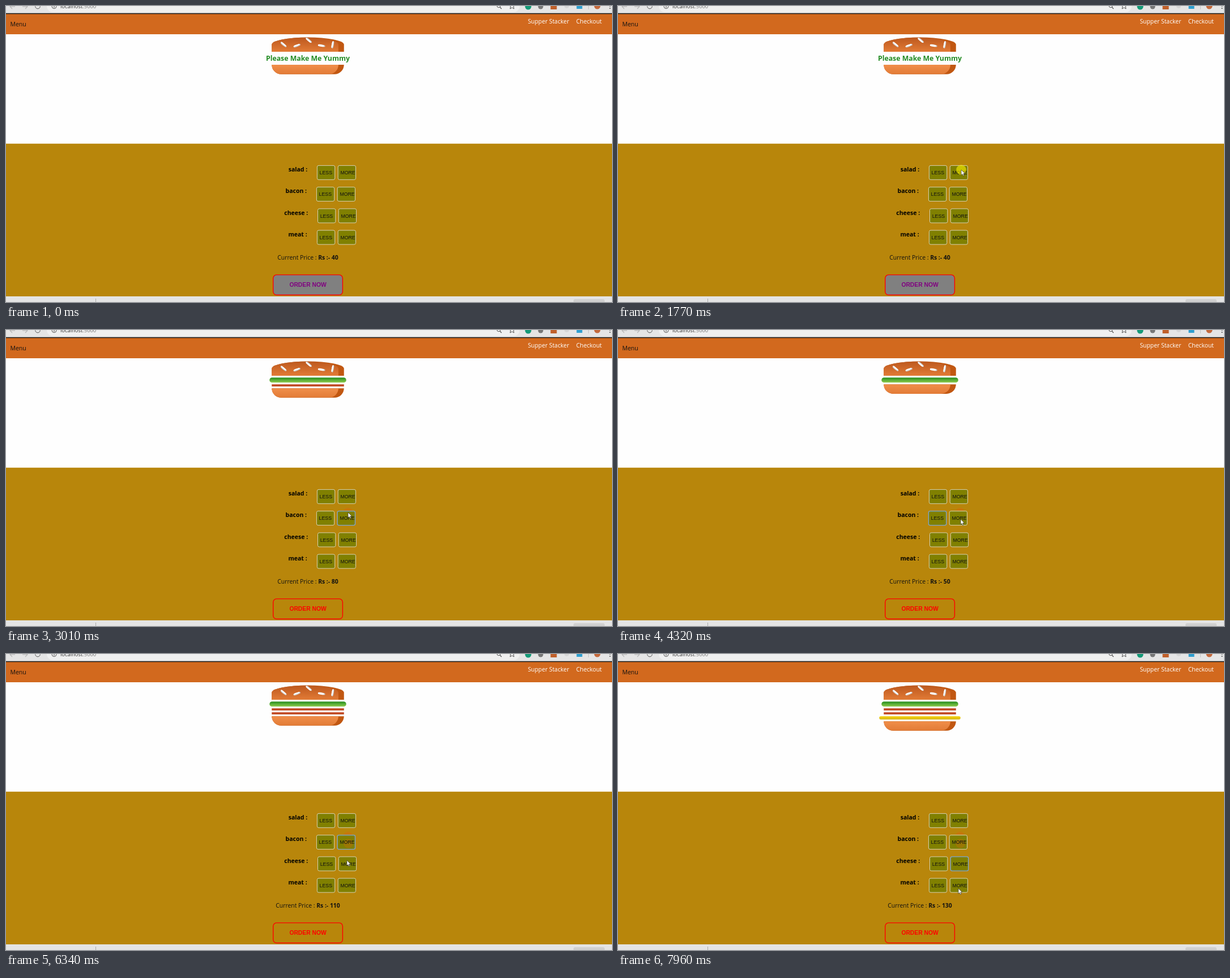
Recreate the animation shown at these times as an HTML page with a canvas. Size 1070 by 524 pixels, loop 8000 ms.

```html
<!DOCTYPE html>
<html lang="en">
<head>
<meta charset="utf-8">
<title>Sandwich order</title>
<style>
html, body { margin: 0; width: 100%; height: 100%; overflow: hidden; background: #fff; }
canvas { display: block; }
</style>
</head>
<body>
<canvas id="stage" width="1070" height="524"></canvas>
<script>
const ctx = document.getElementById('stage').getContext('2d');
const LOOP = 8000;
const SANS = '"Open Sans", "Noto Sans", sans-serif';
const ARIAL = '"Liberation Sans", Arial, sans-serif';
const BASE = 10.5;

// Pointer moves: start, end, steps, x, y
const START = [947, 511];
const MOVES = [
  [210, 360, 3, 679, 403],
  [530, 680, 3, 561, 263],
  [910, 990, 2, 606, 281],
  [1220, 1370, 3, 606, 290],
  [2390, 2620, 4, 604, 323],
  [3160, 3320, 3, 569, 327],
  [4100, 4320, 4, 605, 335],
  [5810, 6420, 9, 601, 374],
  [7190, 7420, 4, 594, 429],
  [7650, 7960, 5, 601, 415]
];

// Clicks: press, release, focused button, layers and price afterwards
const CLICKS = [
  { down: 1770, up: 1850, focus: 'salad+', layers: ['salad'], price: 50 },
  { down: 2930, up: 3010, focus: 'bacon+', layers: ['salad', 'bacon'], price: 80 },
  { down: 3620, up: 3790, focus: 'bacon-', layers: ['salad'], price: 50 },
  { down: 4630, up: 4800, focus: 'bacon+', layers: ['salad', 'bacon'], price: 80 },
  { down: 5410, up: 5580, focus: 'bacon+', layers: ['salad', 'bacon', 'bacon'], price: 110 },
  { down: 6730, up: 6810, focus: 'cheese+', layers: ['salad', 'bacon', 'bacon', 'cheese'], price: 130 }
];

// Controls: name, label x, baseline, button x, button y
const ROWS = [
  ['salad', 498.7, 293, 549.4, 282.4],
  ['bacon', 493.5, 331.2, 548.4, 320.6],
  ['cheese', 491.3, 369.5, 550.5, 358.9],
  ['meat', 498.5, 407.7, 549.4, 397.1]
];

const LAYERS = {
  salad: { w: 135.5, h: 8.9, r: 4.45, colors: ['#228c1d', '#91ce50'] },
  bacon: { w: 127.5, h: 3.8, r: 0, colors: ['#bf3813', '#c45e38'] },
  cheese: { w: 143.5, h: 5.7, r: 2.85, colors: ['#f4d004', '#d6bb22'] }
};
const MID = 533, GAP = 3.19, BUN_W = 127.5, BUN_X = MID - BUN_W / 2;

function rect(x, y, w, h, color) {
  ctx.fillStyle = color;
  ctx.fillRect(x, y, w, h);
}

function round(x, y, w, h, r) {
  ctx.beginPath();
  ctx.roundRect(x, y, w, h, r);
}

function disc(x, y, r, color) {
  ctx.beginPath();
  ctx.arc(x, y, r, 0, Math.PI * 2);
  ctx.fillStyle = color;
  ctx.fill();
}

function line(color, width, ...points) {
  ctx.beginPath();
  points.forEach(([x, y]) => ctx.lineTo(x, y));
  ctx.strokeStyle = color;
  ctx.lineWidth = width;
  ctx.stroke();
}

function ring(x, y, r, color, from = 0, to = Math.PI * 2) {
  ctx.beginPath();
  ctx.arc(x, y, r, from, to);
  ctx.strokeStyle = color;
  ctx.lineWidth = 1;
  ctx.stroke();
}

function text(str, x, y, size, color, weight = 400, family = SANS) {
  ctx.font = `${weight} ${size}px ${family}`;
  ctx.fillStyle = color;
  ctx.fillText(str, x, y);
  return ctx.measureText(str).width;
}

function fade(y, h, [top, bottom]) {
  const g = ctx.createLinearGradient(0, y, 0, y + h);
  g.addColorStop(0, top);
  g.addColorStop(1, bottom);
  return g;
}

// Rounded box with a hard inset shadow
function inset(x, y, w, h, r, fill, shade, dx, dy) {
  ctx.save();
  round(x, y, w, h, r);
  ctx.fillStyle = shade;
  ctx.fill();
  ctx.clip();
  round(x + dx, y + dy, w, h, r);
  ctx.fillStyle = fill;
  ctx.fill();
  ctx.restore();
}

function seed(x, y, deg, dx, dy) {
  ctx.save();
  ctx.translate(x, y);
  ctx.rotate(deg * Math.PI / 180);
  inset(-6.4, -1.9, 12.8, 3.8, { x: 5.1, y: 1.53 }, '#fff', '#c9c9c9', dx, dy);
  ctx.restore();
}

function browser() {
  rect(0, 0, 1070, 13, '#e5e5e5');
  round(72, -12, 835, 23, 11);
  ctx.fillStyle = '#f0f0f0';
  ctx.fill();
  line('#b5b5b5', 1.1, [11, -3], [7, 1], [11, 5]);
  line('#b5b5b5', 1.1, [7, 1], [16, 1]);
  line('#b5b5b5', 1.1, [34, -3], [38, 1], [34, 5]);
  line('#b5b5b5', 1.1, [29, 1], [38, 1]);
  ring(56, 0.5, 4.3, '#555', 0, Math.PI);
  ring(85, 0.5, 4, '#555');
  line('#555', 1, [85, 0], [85, 3]);
  const w = text('localhost', 96, 4, 9.4, '#333');
  text(':5000', 96 + w, 4, 9.4, '#777');

  ring(870, -0.5, 3.2, '#555');
  line('#555', 1.2, [872, 2], [875, 5]);
  line('#555', 1, [889, -1], [891, 1], [890, 5], [893.5, 2.8], [897, 5], [896, 1], [898, -1]);
  disc(922, 1, 5.5, '#159a78');
  disc(944, 1, 4.5, '#777');
  rect(961.5, -5, 11, 11, '#c0602a');
  disc(990, 0, 4, '#d6d6d6');
  rect(1007.5, -5, 10, 10, '#2f9fd0');
  line('#c4c4c4', 1, [1028.5, 0], [1028.5, 6]);
  disc(1044, 0, 5.5, '#c4693c');
  disc(1066.5, 0, 1.1, '#555');
  disc(1066.5, 4, 1.1, '#555');
  rect(0, 12.7, 1070, 1.5, '#151515');

  rect(0, 514, 1070, 10, '#e4e4e4');
  rect(158, 518, 1, 6, '#a9a9a9');
  round(1002, 519, 55, 12, 3);
  ctx.fillStyle = '#d0d0d0';
  ctx.fill();
}

function page() {
  rect(0, 0, 1070, 524, '#fefefe');
  rect(0, 14, 1070, 36, '#d2691e');
  rect(0, 243.7, 1070, 270.3, '#b8860b');
  text('Menu', 7.5, 36.3, BASE, '#111');
  ctx.textAlign = 'right';
  text('Supper Stacker', 994.4, 30.6, 10.4, '#fff', 500);
  text('Checkout', 1052, 30.6, 10.4, '#fff', 500);
  ctx.textAlign = 'left';
}

function burger(layers) {
  inset(BUN_X, 55.5, BUN_W, 25.5, [{ x: BUN_W / 2, y: 12.75 }, { x: BUN_W / 2, y: 12.75 }, 0, 0],
    fade(55.5, 25.5, ['#bc581e', '#e27b36']), '#c15711', -9.84, 0);
  seed(513.8, 70.2, -20, -1.3, -2 / 1.5);
  seed(490, 68.3, 40, -0.7, -1.3);
  seed(534.7, 60.6, 40, -0.7, 1.3);
  seed(557.2, 70.2, 10, -2, 0);
  seed(576.9, 68.6, 100, -0.7, 1.3);

  let y = 81 + GAP;
  for (const name of layers) {
    const { w, h, r, colors } = LAYERS[name];
    round(MID - w / 2, y, w, h, r);
    ctx.fillStyle = fade(y, h, colors);
    ctx.fill();
    y += h + GAP;
  }
  if (!layers.length) {
    ctx.textAlign = 'center';
    text('Please Make Me Yummy', MID, 97.4, 12.3, '#228b22', 700);
    ctx.textAlign = 'left';
    y = 104.1;
  }
  inset(BUN_X, y, BUN_W, 16.6, [0, 0, 16.6, 16.6],
    fade(y, 16.6, ['#f08e4a', '#e27b36']), '#c15711', -9.84, 0);
}

function button(label, x, y, focused, stain) {
  round(x, y, 31.3, 25, 2.6);
  ctx.fillStyle = '#808000';
  ctx.fill();
  if (stain) disc(604.5, 335.5, 8.3, 'rgba(200, 105, 10, .38)');
  round(x, y, 31.3, 25, 2.6);
  ctx.strokeStyle = focused ? '#78a6d8' : '#d6d2b4';
  ctx.lineWidth = focused ? 1.3 : 1;
  ctx.stroke();
  text(label, x + 4.2, y + 15.7, 8.75, '#111', 400, ARIAL);
}

function controls(focus, t) {
  // Faint marks left behind by earlier clicks
  if (t >= 3010) disc(604, 323, 8.3, 'rgba(215, 105, 15, .45)');
  for (const [name, lx, ly, bx, by] of ROWS) {
    text(name + ' :', lx, ly, BASE, '#000', 700);
    button('LESS', bx, by, focus === name + '-');
    button('MORE', bx + 36.8, by, focus === name + '+', name === 'bacon' && t >= 4800);
  }
}

function order(price) {
  const label = 'Current Price : ', value = 'Rs :- ' + price;
  ctx.font = `700 10.4px ${SANS}`;
  const bold = ctx.measureText(value).width;
  ctx.font = `400 10.4px ${SANS}`;
  const x = MID - (ctx.measureText(label).width + bold) / 2;
  const w = text(label, x, 449.3, 10.4, '#111');
  text(value, x + w, 449.3, 10.4, '#111', 700);

  const ready = price > 40;
  round(471.7, 475.9, 122.7, 35.6, 6);
  if (!ready) {
    ctx.fillStyle = '#808080';
    ctx.fill();
  }
  ctx.strokeStyle = '#f00';
  ctx.lineWidth = 1.4;
  ctx.stroke();
  ctx.textAlign = 'center';
  text('ORDER NOW', MID, 497.3, 10.3, ready ? '#f00' : '#800080', 700, ARIAL);
  ctx.textAlign = 'left';
}

function pointerAt(t) {
  let [x, y] = START;
  for (const [from, to, n, tx, ty] of MOVES) {
    if (t < from) break;
    const gap = (to - from) / (n - 1);
    const p = Math.min(n, Math.floor((t - from) / gap + 0.01) + 1) / n;
    x += (tx - x) * p;
    y += (ty - y) * p;
  }
  return [x, y];
}

function pointer(t) {
  if (t < MOVES[0][0]) return;
  const [x, y] = pointerAt(t);
  if (CLICKS.some(c => t >= c.down && t < c.up)) disc(x, y, 8.7, 'rgba(255, 245, 0, .58)');
  ctx.save();
  ctx.translate(x, y);
  ctx.beginPath();
  [[0, 0], [0, 9.3], [2.1, 7.4], [3.6, 10.7], [5.1, 10], [3.7, 6.8], [6.6, 6.6]]
    .forEach(([px, py]) => ctx.lineTo(px, py));
  ctx.closePath();
  ctx.fillStyle = '#fff';
  ctx.fill();
  ctx.strokeStyle = '#222';
  ctx.lineWidth = 0.6;
  ctx.stroke();
  ctx.restore();
}

function draw(t) {
  let layers = [], price = 40, focus = '';
  for (const c of CLICKS) {
    if (t >= (c === CLICKS[0] ? c.up : c.down)) focus = c.focus;
    if (t >= c.up) ({ layers, price } = c);
  }
  page();
  browser();
  burger(layers);
  controls(focus, t);
  order(price);
  pointer(t);
}

const begin = performance.now();
function tick() {
  draw((performance.now() - begin) % LOOP);
  requestAnimationFrame(tick);
}
tick();
</script>
</body>
</html>
```
